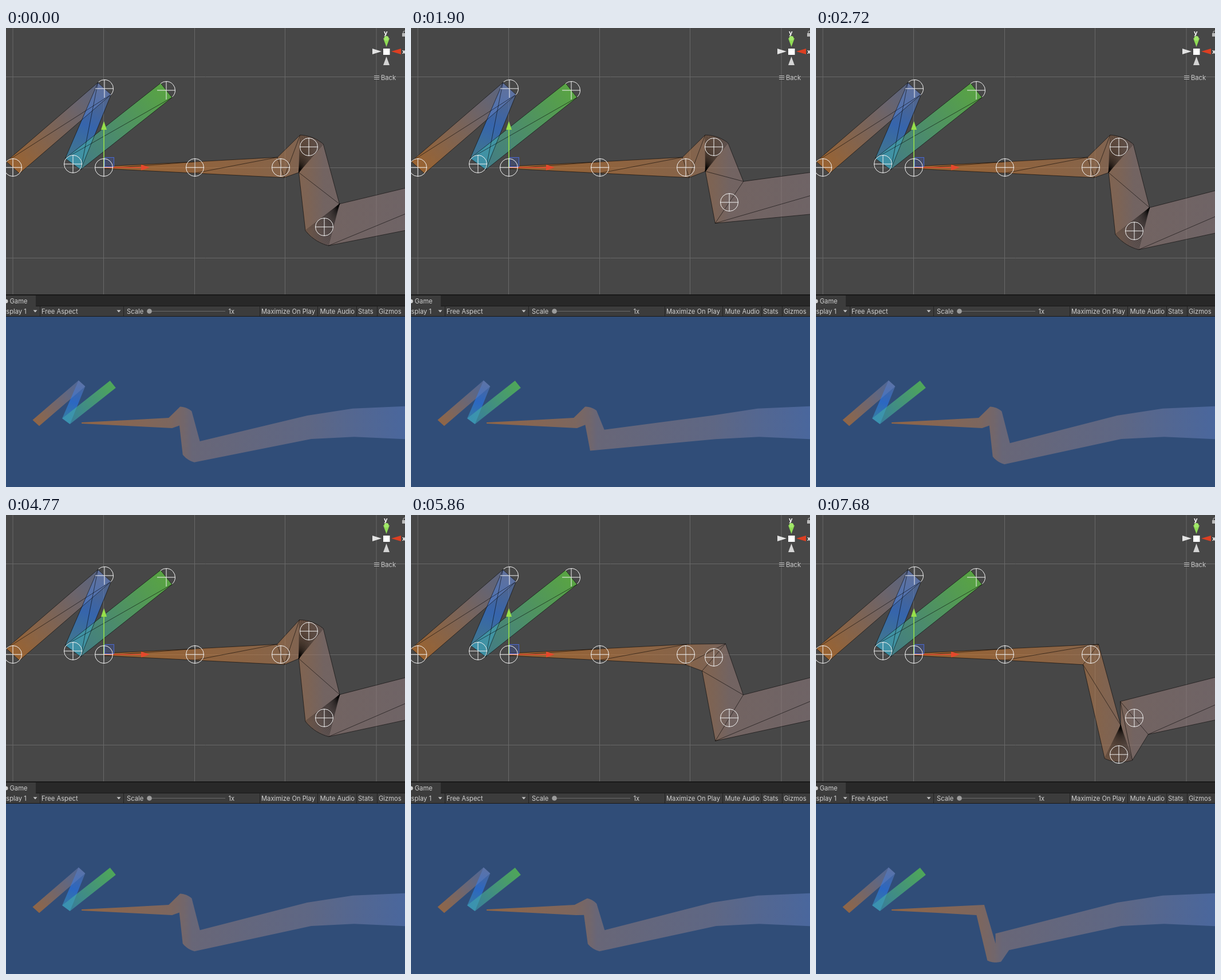
Recreate the animation shown at these times as an HTML page with a canvas. Size 697x803 px, loop 7990 ms.

```html
<!DOCTYPE html>
<html>
<head>
<meta charset="utf-8">
<style>
html, body { margin: 0; width: 100%; height: 100%; overflow: hidden; background: #474747; }
canvas { display: block; }
</style>
</head>
<body>
<canvas id="stage" width="697" height="803"></canvas>
<script>
const c = document.getElementById('stage').getContext('2d');
const LOOP = 7990, LAG = 78, ALPHA = 0.55, FAN = 32;
const ORANGE = [223, 122, 29], BLUE = [40, 125, 255], GREEN = [104, 240, 63];

// start, end, steps, dragged point, y it reaches
const moves = [
  [500, 900, 6, 4, 325], [1300, 1500, 4, 4, 304], [1900, 1970, 1, 4, 305], [1970, 2640, 10, 4, 355],
  [4770, 5330, 9, 3, 165], [5640, 5840, 4, 3, 249], [5940, 6390, 6, 3, 310],
  [6440, 6640, 4, 3, 330], [6910, 6980, 2, 3, 350], [7180, 7320, 3, 3, 401],
  [7520, 7680, 3, 3, 419]
];
const rest = [[171, 244], [330, 244], [480, 244], [529, 208], [556, 348], [963, 259], [1117, 243], [1296, 243], [1500, 243]];
const zigzag = [[12, 244], [172, 106], [117, 238], [280, 109]];
const zigzagHalf = [[11.5, 10.5], [11.5, 10.5], [13.5, 10], [10, 12.5]];

function pose(t) {
  const pts = rest.map(p => p.slice());
  for (const [start, end, n, i, y] of moves) {
    if (t < start) break;
    const step = Math.min(n, Math.floor((t - start) / (end - start) * (n - 1) + 1e-6) + 1);
    pts[i][1] += (y - pts[i][1]) * step / n;
  }
  return pts;
}

function tint(u) {
  const [from, to, k] = u < 0.5 ? [ORANGE, BLUE, u * 2] : [BLUE, GREEN, u * 2 - 1];
  return `rgba(${from.map((v, i) => Math.round(v + (to[i] - v) * k))},${ALPHA})`;
}

const dist = (p, q) => Math.hypot(q[0] - p[0], q[1] - p[1]);
const heading = (p, q) => Math.atan2(q[1] - p[1], q[0] - p[0]);
const offset = (p, dir, len) => [p[0] + Math.sin(dir) * len, p[1] - Math.cos(dir) * len];

// Both sides of the joint at point i: a mitre, or a fan when the turn passes 90 degrees
function joint(pts, i) {
  const p = pts[i], w = 2 + 7.9 * i;
  const d0 = heading(pts[Math.max(0, i - 1)], pts[Math.max(1, i)]);
  const d1 = i < pts.length - 1 ? heading(p, pts[i + 1]) : d0;
  const turn = d1 - d0, mid = (d0 + d1) / 2;
  const len = Math.min(w / Math.cos(turn / 2), 2 * w);
  if (Math.abs(turn) <= Math.PI / 2) return { a: [offset(p, mid, len)], b: [offset(p, mid, -len)] };
  const s = turn > 0 ? -1 : 1;
  const inner = offset(p, mid, s * len);
  const start = offset(p, d0, -s * w), end = offset(p, d1, -s * w);
  const r = dist(inner, start), g = heading(inner, start);
  let sweep = heading(inner, end) - g;
  sweep = Math.atan2(Math.sin(sweep), Math.cos(sweep));
  const arc = [];
  for (let k = 0; k <= FAN; k++) {
    const angle = g + sweep * k / FAN;
    arc.push([inner[0] + r * Math.cos(angle), inner[1] + r * Math.sin(angle)]);
  }
  return s > 0 ? { a: [inner], b: arc } : { a: arc, b: [inner] };
}

function path(pts, close) {
  c.beginPath();
  pts.forEach(p => c.lineTo(p[0], p[1]));
  if (close) c.closePath();
}
function fill(pts, color) { path(pts, true); c.fillStyle = color; c.fill(); }
function stroke(pts, color, width = 1) {
  path(pts); c.strokeStyle = color; c.lineWidth = width; c.stroke();
}
function rect(x, y, w, h, color) { c.fillStyle = color; c.fillRect(x, y, w, h); }
function text(s, x, y, color = '#d0d0d0', font = '11.2px Inter, sans-serif') {
  c.font = font; c.fillStyle = color; c.fillText(s, x, y);
}
function disc(x, y, r, color) {
  c.beginPath(); c.arc(x, y, r, 0, 7); c.fillStyle = color; c.fill();
}
const wire = (pts, width = 0.8) => stroke(pts, 'rgba(0,0,0,.7)', width);

// The colour advances evenly from point to point, whatever their distance
const ribbonPaint = (() => {
  const x0 = rest[0][0], span = rest[8][0] - x0;
  const g = c.createLinearGradient(x0, 0, x0 + span, 0);
  rest.forEach((p, i) => g.addColorStop((p[0] - x0) / span, tint(i / 20)));
  return g;
})();

function drawRibbon(pts, wired) {
  const joints = pts.map((_, i) => joint(pts, i));
  const a = joints.flatMap(j => j.a), b = joints.flatMap(j => j.b);
  fill([...a, ...b.slice().reverse()], ribbonPaint);
  if (!wired) return;
  wire(a);
  wire(b);
  joints.forEach((j, i) => {
    const n = Math.max(j.a.length, j.b.length);
    for (let k = 0; k < n; k++) wire([j.a[k] || j.a[0], j.b[k] || j.b[0]], n > 1 ? 0.45 : 0.8);
    if (joints[i + 1]) wire([j.b[j.b.length - 1], joints[i + 1].a[0]]);
  });
}

function drawZigzag(wired) {
  const side = s => zigzag.map(([x, y], i) => [x + s * zigzagHalf[i][0], y + s * zigzagHalf[i][1]]);
  const a = side(-1), b = side(1);
  for (let i = 0; i < 3; i++) {
    const g = c.createLinearGradient(...zigzag[i], ...zigzag[i + 1]);
    for (let k = 0; k <= 4; k++) g.addColorStop(k / 4, tint((i + k / 4) / 3));
    fill([a[i], a[i + 1], b[i + 1], b[i]], g);
  }
  if (!wired) return;
  wire(a);
  wire(b);
  a.forEach((p, i) => {
    wire([p, b[i]]);
    if (i < 3) wire([p, b[i + 1]]);
  });
}

// A raised handle shows only the half of its ring that lies outside the strip
function handle([x, y], raised) {
  c.beginPath();
  if (raised) c.arc(x, y, 15.5, -2.3, 0.85);
  else c.arc(x, y, 15.5, 0, 7);
  c.moveTo(x - 16, y); c.lineTo(x + 16, y);
  c.moveTo(x, y - 16); c.lineTo(x, y + 16);
  c.strokeStyle = '#f4f4f4';
  c.lineWidth = 1;
  c.stroke();
}

function drawCompass() {
  fill([[659, 18], [670, 18], [664.5, 33]], '#8fdc55');
  disc(664.5, 18, 4, '#a2e86a');
  fill([[640, 36], [640, 46], [656, 41]], '#e2e2e2');
  fill([[690, 36], [690, 46], [673, 41]], '#dc3f22');
  fill([[659, 65], [670, 65], [664.5, 50]], '#d4d4d4');
  rect(659, 36, 11.5, 11, '#fff');
  text('y', 660, 12, '#fff', 'bold 11px Inter, sans-serif');
  text('x', 692, 45, '#fff', 'bold 11px Inter, sans-serif');
  rect(692, 9, 5, 6, '#bbb');
  stroke([[694, 9], [694, 6], [697, 5]], '#bbb');
  for (const y of [83.5, 86.5, 89.5]) stroke([[643, y], [652, y]], '#bdbdbd');
  text('Back', 655, 90.5, '#c8c8c8');
}

function drawScene(pts) {
  rect(0, 0, 697, 467, '#474747');
  for (const x of [12, 170.5, 329.5, 487.5, 647]) stroke([[x, 0], [x, 467]], '#686868');
  for (const y of [85.5, 244.5, 402.5]) stroke([[0, y], [697, y]], '#686868');
  drawZigzag(true);
  drawRibbon(pts, true);
  rect(172, 226, 17, 17, 'rgba(60,90,200,.25)');
  c.strokeStyle = '#4a69d2';
  c.lineWidth = 1;
  c.strokeRect(172.5, 226.5, 16, 16);
  stroke([[171, 244], [171, 176]], '#96df4b', 1.6);
  fill([[166, 178], [176, 178], [171, 163]], '#96df4b');
  stroke([[171, 244], [238, 244]], '#e6482c', 1.6);
  fill([[236, 239], [236, 249], [251, 244]], '#e6482c');
  zigzag.forEach((p, i) => handle(p, i % 2));
  pts.slice(0, 5).forEach(p => handle(p));
  drawCompass();
}

function drawToolbar() {
  rect(0, 466, 697, 39, '#191919');
  rect(0, 468, 697, 18, '#282828');
  rect(0, 468, 52, 19, '#3c3c3c');
  rect(0, 487, 697, 17, '#3c3c3c');
  disc(0, 478, 3.5, '#d0d0d0');
  text('Game', 6.5, 482);
  for (const x of [59, 205, 443, 544, 612, 648]) rect(x, 487, 1, 17, '#232323');
  for (const x of [51, 197]) fill([[x - 3.5, 493.5], [x + 3.5, 493.5], [x, 497.5]], '#c4c4c4');
  rect(250, 495, 133, 1, '#6a6a6a');
  disc(250.5, 495.5, 4.3, '#9c9c9c');
  const labels = [['Display 1', -10.5], ['Free Aspect', 62], ['Scale', 211], ['1x', 388.5],
    ['Maximize On Play', 446], ['Mute Audio', 548.5], ['Stats', 615], ['Gizmos', 651]];
  for (const [s, x] of labels) text(s, x, 499.5);
}

function drawGame(pts) {
  rect(0, 505, 697, 298, '#304d78');
  c.save();
  c.transform(0.502, 0, 0, 0.502, 46.2, 568.5);
  drawZigzag(false);
  drawRibbon(pts, false);
  c.restore();
}

function frame() {
  const t = performance.now() % LOOP;
  drawScene(pose(t));
  drawToolbar();
  drawGame(pose(Math.max(0, t - LAG)));
  requestAnimationFrame(frame);
}
frame();
</script>
</body>
</html>
```
